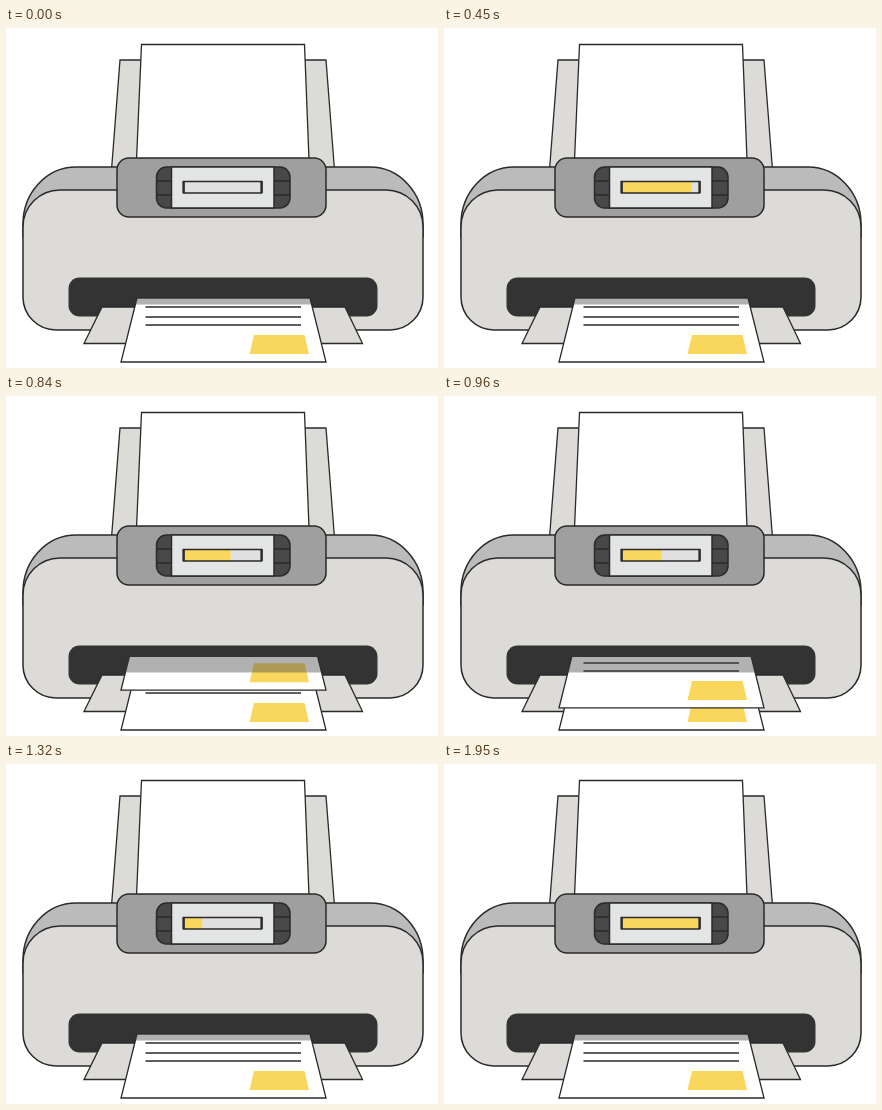
Recreate the animation shown at these times as an HTML page with a canvas. Size 432 by 340 pixels, loop 3030 ms.

```html
<!DOCTYPE html>
<html lang="en">
<head>
<meta charset="utf-8">
<title>Printer</title>
<style>
html, body { margin: 0; width: 100%; height: 100%; overflow: hidden; background: #fff; }
canvas { display: block; width: 432px; height: 340px; }
</style>
</head>
<body>
<canvas id="stage"></canvas>
<script>
const W = 432, H = 340, LOOP = 3030, STEP = 30;
const INK = '#2b2a2a', DARK = '#333', SHELL = '#dcdbd7', YELLOW = '#f9d75c';
const SLOT_Y = 261, TRAVEL = 73;
const canvas = document.getElementById('stage');
const ctx = canvas.getContext('2d');
const dpr = window.devicePixelRatio || 1;
canvas.width = W * dpr;
canvas.height = H * dpr;

function paint(fill, line = 1.5) {
  if (fill) {
    ctx.fillStyle = fill;
    ctx.fill();
  }
  if (line) {
    ctx.strokeStyle = INK;
    ctx.lineWidth = line;
    ctx.stroke();
  }
}

// Shape with a flat top from x1 to x2 and a flat base from x3 to x4.
function quad(x1, x2, top, x3, x4, base, fill, line) {
  ctx.beginPath();
  ctx.moveTo(x1, top);
  ctx.lineTo(x2, top);
  ctx.lineTo(x4, base);
  ctx.lineTo(x3, base);
  ctx.closePath();
  paint(fill, line);
}

function box(x, y, w, h, r, fill, line) {
  ctx.beginPath();
  ctx.roundRect(x, y, w, h, r);
  paint(fill, line);
}

function rule(x1, x2, y) {
  ctx.beginPath();
  ctx.moveTo(x1, y);
  ctx.lineTo(x2, y);
  paint(null);
}

// Bar level: quick rise, slow linear drain, quick rise, hold.
function level(t) {
  const cycle = 1620, rise = 330;
  if (t >= cycle + rise) return 1;
  const u = t % cycle;
  return u < rise ? (u / rise) ** 1.8 : (cycle - u) / (cycle - rise);
}

// Distance the delivered sheet still has to go, easing out.
function remaining(t) {
  const s = Math.min(1, Math.max(0, (t - 690) / 820));
  return TRAVEL * (1 - s) ** 3;
}

function blankPaper(dy) {
  quad(135.5, 298.5, 16.5 + dy, 130.5, 303, 132 + dy, '#fff', 1.3);
}

function printedSheet(dy) {
  ctx.save();
  ctx.beginPath();
  ctx.rect(0, SLOT_Y, W, H);
  ctx.clip();
  ctx.translate(0, dy);
  quad(131, 304, 270, 115, 320, 334, '#fff', 1.3);
  for (const y of [279, 289, 297]) rule(139.5, 295, y);
  quad(248, 298.5, 307, 243.5, 303, 326, YELLOW, 0);
  // Shade under the slot, kept to the sheet.
  quad(131, 304, 270, 115, 320, 334, null, 0);
  ctx.clip();
  ctx.fillStyle = 'rgba(70,70,70,0.42)';
  ctx.fillRect(0, SLOT_Y - dy, W, 15.5);
  ctx.restore();
}

function body() {
  const shoulder = { x: 53, y: 57 };
  box(17, 139, 400, 70, [shoulder, shoulder, 0, 0], '#bbb');
  box(17, 162, 400, 140, [37, 37, 33, 33], SHELL);
}

function progressBar(t) {
  box(177.5, 153.5, 78, 11.5, 0, '#e0e0e0', 0);
  ctx.fillStyle = YELLOW;
  ctx.fillRect(178.5, 154, 76 * level(t), 11);
  box(177.5, 153.5, 78, 11.5, 0, null);
  ctx.fillStyle = INK;
  for (const x of [176.5, 254.5]) ctx.fillRect(x, 153, 2.3, 12);
}

function panel(t) {
  box(111, 130, 209, 59, 12, '#9f9f9f');
  box(150.5, 139, 133.5, 41, 10, '#484848');
  for (const y of [153, 167]) {
    rule(150.5, 165.5, y);
    rule(268, 284, y);
  }
  box(165.5, 139, 102.5, 41, 0, '#e3e5e4');
  progressBar(t);
}

function draw(t) {
  ctx.setTransform(dpr, 0, 0, dpr, 0, 0);
  ctx.fillStyle = '#fff';
  ctx.fillRect(0, 0, W, H);

  quad(114, 320, 32, 105.5, 328.5, 142, SHELL, 1.3);
  blankPaper(0);
  const feed = 41.5 * (t / 270) ** 2;
  if (feed > 0 && feed < 120) blankPaper(feed);

  body();
  panel(t);
  box(62.5, 249.5, 309, 39, 11, DARK, 0);
  quad(96, 339, 279, 78, 356.5, 315.5, SHELL, 1.3);
  printedSheet(0);
  const left = remaining(t);
  if (left > 1 && left < TRAVEL) printedSheet(-left);
}

function tick() {
  const t = performance.now() % LOOP;
  draw(Math.floor(t / STEP) * STEP);
  requestAnimationFrame(tick);
}
tick();
</script>
</body>
</html>
```
